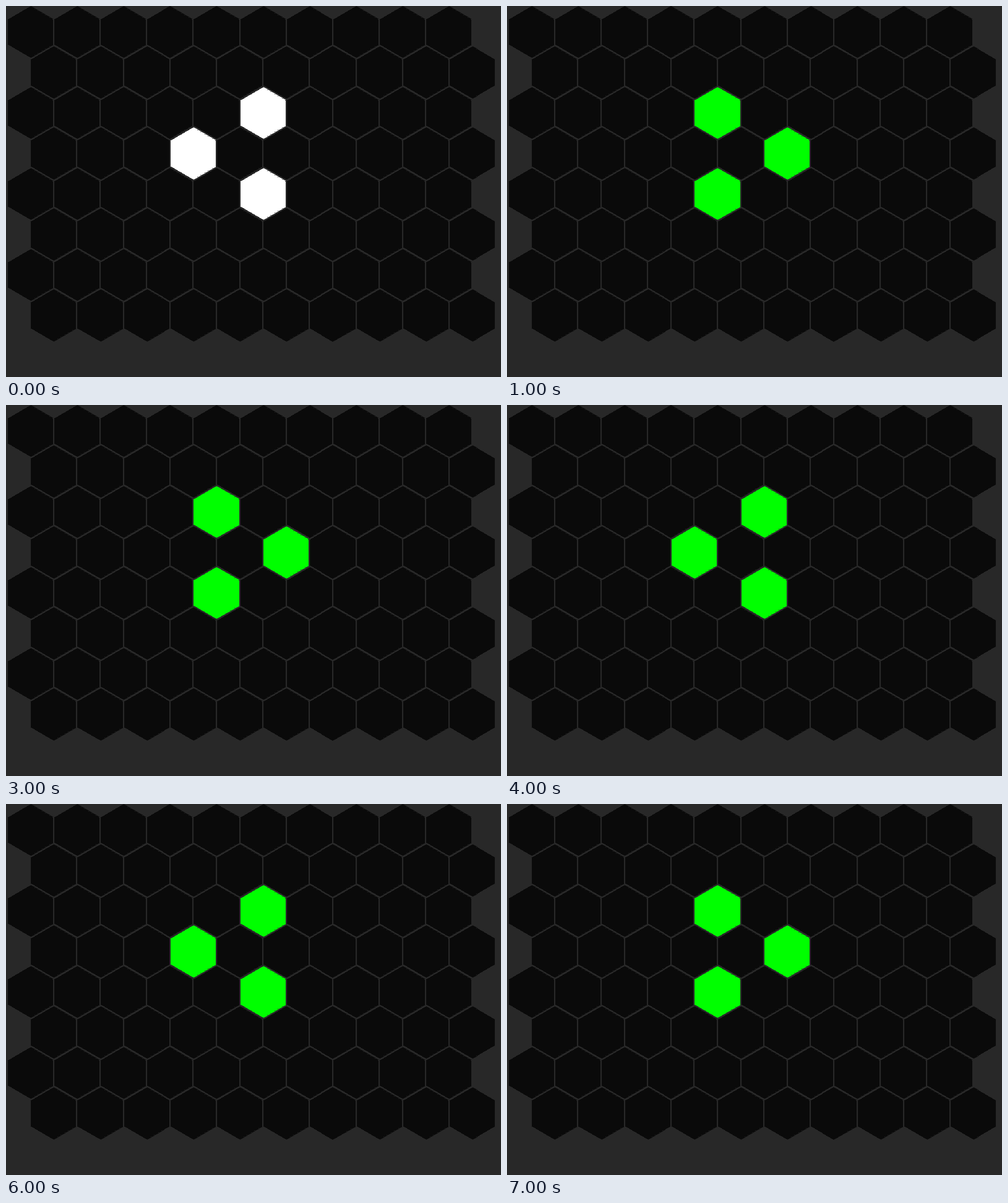
Animation of 800x600 px, one loop 8000 ms. Source, as an HTML page:

```html
<!DOCTYPE html>
<html>
<head>
<meta charset="utf-8">
<style>
html, body { margin: 0; width: 100%; height: 100%; overflow: hidden; background: #282828; }
svg { display: block; }
polygon { fill: currentColor; stroke: currentColor; stroke-width: 0.9; }
</style>
</head>
<body>
<svg id="board" width="800" height="600" shape-rendering="crispEdges"></svg>
<script>
const ROWS = 8, COLS = 10, RADIUS = 41.67, GAP = 3;
const PITCH_X = Math.sqrt(3) * RADIUS + GAP, PITCH_Y = 1.5 * RADIUS + GAP;
const PATTERNS = [['2,5', '3,3', '4,5'], ['2,4', '3,5', '4,4']];
const board = document.getElementById('board');
const cells = {};

// Corners snap to pixel centres; the thin stroke includes the edge pixels.
function hexPoints(cx, cy) {
  return Array.from({ length: 6 }, (_, i) => {
    const angle = (i + 0.5) * Math.PI / 3;
    return [cx + RADIUS * Math.cos(angle), cy + RADIUS * Math.sin(angle)].map(v => Math.floor(v) + 0.5);
  }).join(' ');
}

for (let row = 0; row < ROWS; row++) {
  for (let col = 0; col < COLS; col++) {
    const hex = document.createElementNS('http://www.w3.org/2000/svg', 'polygon');
    hex.setAttribute('points', hexPoints(39.28 + (col + row % 2 / 2) * PITCH_X, 42 + row * PITCH_Y));
    cells[row + ',' + col] = board.appendChild(hex);
  }
}

function draw() {
  const step = Math.floor(performance.now() % 8000 / 1000);
  const lit = PATTERNS[step % 2];
  const color = step === 0 ? '#fff' : '#0f0';
  for (const key in cells) cells[key].style.color = lit.includes(key) ? color : '#0a0a0a';
  requestAnimationFrame(draw);
}
draw();
</script>
</body>
</html>
```
